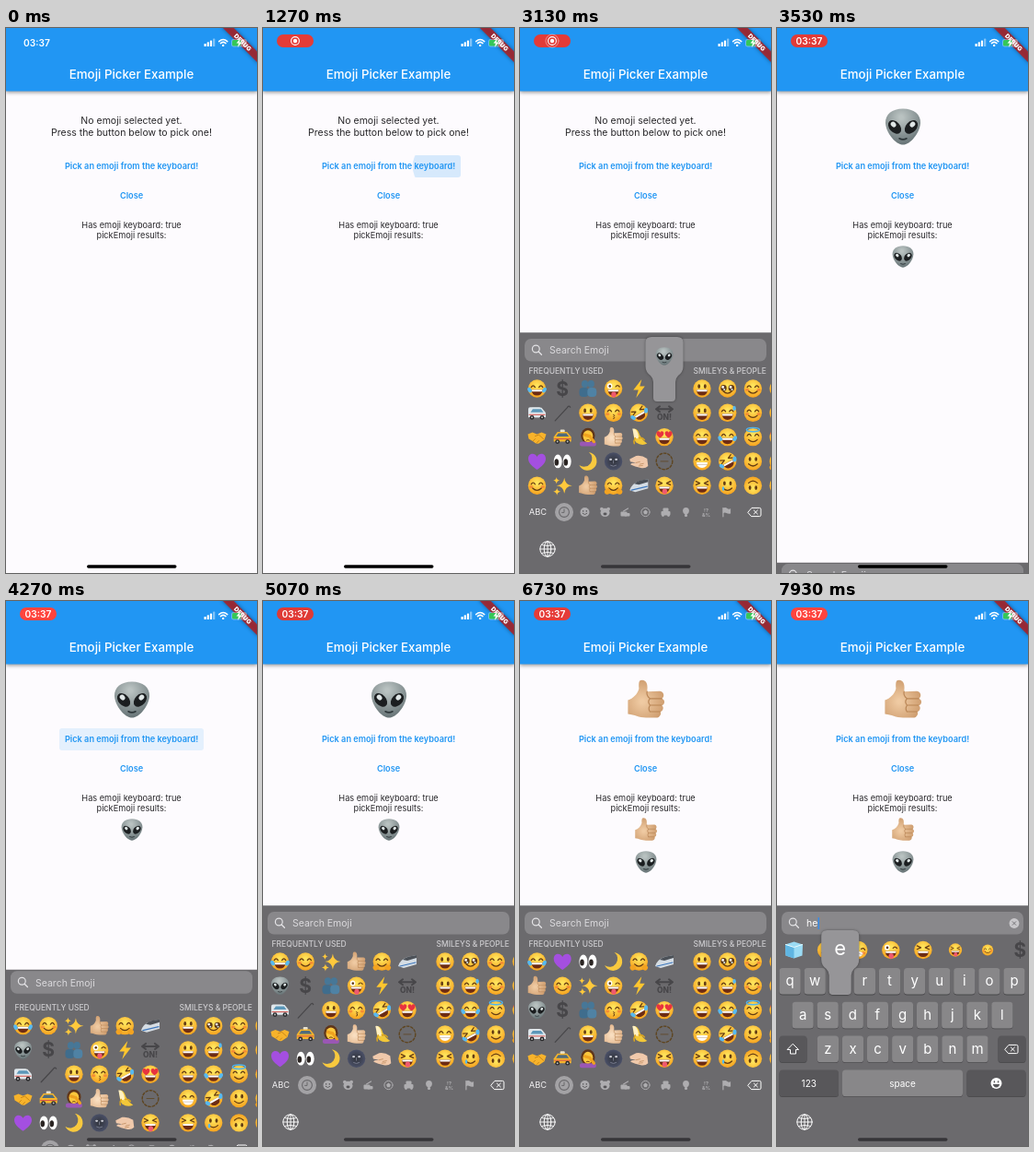
An HTML page with a canvas for the animation above (8 s loop, 273 px wide and 591 px high).

```html
<!DOCTYPE html>
<html lang="en">
<head>
<meta charset="utf-8">
<title>Emoji Picker Example</title>
<style>
  html, body { margin: 0; width: 100%; height: 100%; overflow: hidden; }
  canvas { display: block; width: 273px; height: 591px; }
</style>
</head>
<body>
<canvas></canvas>
<script>
const W = 273, H = 591, LOOP = 8000;
const canvas = document.querySelector('canvas');
const ctx = canvas.getContext('2d');
const dpr = window.devicePixelRatio || 1;
canvas.width = W * dpr;
canvas.height = H * dpr;

const BLUE = '#2196f3', BROWN = '#633b12', FOLD = '#b98555', DARK = '#474649';
const KEYBOARD = '#6b6a6d', KEY = '#888789', DIM = '#58575a', PALE = '#cccbce';

// Drawing helpers
const clamp = v => Math.max(0, Math.min(1, v));
const ramp = (t, start, length) => clamp((t - start) / length);
function fill(d, color) { ctx.fillStyle = color; ctx.fill(new Path2D(d)); }
function line(d, color, width = 1.2) {
  ctx.strokeStyle = color;
  ctx.lineWidth = width;
  ctx.lineCap = ctx.lineJoin = 'round';
  ctx.stroke(new Path2D(d));
}
function oval(x, y, rx, ry, color, angle = 0) {
  ctx.fillStyle = color;
  ctx.beginPath();
  ctx.ellipse(x, y, rx, ry, angle, 0, 7);
  ctx.fill();
}
function ring(x, y, rx, ry, color, width = 1) {
  ctx.strokeStyle = color;
  ctx.lineWidth = width;
  ctx.beginPath();
  ctx.ellipse(x, y, rx, ry, 0, 0, 7);
  ctx.stroke();
}
function box(x, y, w, h, r, color) {
  ctx.fillStyle = color;
  ctx.beginPath();
  ctx.roundRect(x, y, w, h, r);
  ctx.fill();
}
function text(str, x, midY, size, color, weight = 400, align = 'center') {
  ctx.font = `${weight} ${size}px Inter, sans-serif`;
  ctx.textAlign = align;
  ctx.fillStyle = color;
  ctx.fillText(str, x, midY + size * 0.36);
}
function at(x, y, scale, draw, angle = 0) {
  ctx.save();
  ctx.translate(x, y);
  ctx.rotate(angle);
  ctx.scale(scale, scale);
  draw();
  ctx.restore();
}
function faded(alpha, draw) {
  if (alpha <= 0) return;
  ctx.save();
  ctx.globalAlpha *= alpha;
  draw();
  ctx.restore();
}
const pair = draw => [-1, 1].forEach(draw);
function shade(x, y, r, inner, outer) {
  const g = ctx.createRadialGradient(x, y, 1, x, y, r);
  g.addColorStop(0, inner);
  g.addColorStop(1, outer);
  return g;
}

// Emoji, each about 20 units wide around the origin
const heart = (x, y, s, color) => at(x, y, s, () =>
  fill('M0 9C-5 5.5-9.5 2-9.5-3C-9.5-9-2.5-10 0-5C2.5-10 9.5-9 9.5-3C9.5 2 5 5.5 0 9Z', color));
const star = (x, y, s) => at(x, y, s, () => fill('M0-10Q1-1 10 0Q1 1 0 10Q-1 1-10 0Q-1-1 0-10Z', '#ffc93c'));

const eyes = {
  dots: () => pair(s => oval(s * 3.3, -2.4, 1.4, 2.3, BROWN)),
  arcs: () => line('M-6.3-1.4Q-4.2-5-2.1-1.4M2.1-1.4Q4.2-5 6.3-1.4', BROWN),
  squint: () => line('M-6.6-4.6L-2.4-2.6L-6.6-.8M6.6-4.6L2.4-2.6L6.6-.8', BROWN),
  hearts: () => pair(s => heart(s * 4.6, -2.8, 0.42, '#e8333f')),
  wink: () => { oval(-4, -2.8, 2.8, 3, '#fff'); oval(-3.8, -2.6, 1.3, 1.4, BROWN); line('M2.4-2Q4.4-4.6 6.6-2', BROWN); },
  wide: () => pair(s => {
    oval(s * 4.2, -0.6, 3.2, 3.3, '#5c3717');
    oval(s * 4.2 - 0.8, -1.6, 1.4, 1.4, '#fff');
    oval(s * 4.2 + 0.7, 1, 1.1, 0.9, '#cfe3ee');
  })
};
const mouths = {
  grin: () => { fill('M-6 1.2H6Q5.6 7.6 0 7.6Q-5.6 7.6-6 1.2Z', '#6d2c14'); fill('M-5.8 1.2H5.8L5.3 3.2H-5.3Z', '#fff'); },
  teeth: () => { fill('M-6 1.2H6Q5.6 7 0 7Q-5.6 7-6 1.2Z', '#fff'); line('M-5.6 3.6H5.6', '#b79a80', 0.5); },
  smile: () => line('M-4.8 2.8Q0 7.4 4.8 2.8', BROWN),
  kiss: () => line('M0 2Q2.8 2.9.2 4.2Q2.8 5.4 0 6.4', BROWN, 1),
  tongue: () => { mouths.grin(); oval(0.4, 6.4, 2.7, 3, '#ef5a6f'); }
};
const blush = () => pair(s => oval(s * 6.2, 1.4, 2, 1.4, 'rgba(240,90,50,.5)'));
const tears = () => pair(s => oval(s * 8, 1.6, 2, 3, '#55b9f3', s * 0.5));
const sweat = () => oval(7.4, -5, 1.7, 2.6, '#55b9f3');
const drop = () => oval(-4.6, 3.4, 1.2, 2.4, '#55b9f3');
const halo = () => ring(0, -8, 7, 2.2, '#4fb4ee', 1.5);
const hands = () => pair(s => oval(s * 6.4, 6.4, 3.4, 3, '#f3a321', s * 0.5));
function face(eye, mouth, extra, angle = 0) {
  return () => at(0, 0, 1, () => {
    oval(0, 0, 9.7, 9.7, shade(0, -3, 13, '#ffe45c', '#f6a11d'));
    eyes[eye]();
    mouths[mouth]();
    if (extra) extra();
  }, angle);
}
const fist = (inner, outer) => () => {
  fill('M-9.8.2C-7-.6-4.6-3-3.8-6C-4-9-3.9-10.6-2.2-10.6C.4-10.6 1.2-8 .6-4.4L7.6-4.6C10-4.4 10.2-1.2 8.6-.6' +
       'C10.6 0 10.4 2.8 8.6 3.1C9.9 3.8 9.4 6.3 7.8 6.5C8.6 7.6 7.6 9.8 5.6 9.8H0C-4 9.8-6 8.2-9.8 7.8Z',
       shade(-2, 1, 12, inner, outer));
  line('M2.2-.6H8.6M2.2 3H8.4M2.2 6.5H7.6M.6-4.4Q0-2.2 2.2-.6Q.6 1 2.2 3Q1 5 2.2 6.5', FOLD, 0.6);
};
function car(body, glass) {
  fill('M-9.5 5V0L-5.5-5.5H5L9.5 0V5Z', body);
  fill('M-7-.5L-4.6-4H4.4L7-.5Z', glass);
  line('M-8.5 2H8.5', '#d9534a', 1);
  pair(s => { oval(s * 5.5, 5, 2.4, 2.4, '#29292b'); oval(s * 5.5, 5, 1, 1, '#bbb'); });
}
const emoji = {
  joy: face('arcs', 'grin', tears), blush: face('arcs', 'smile', blush), grin: face('dots', 'grin'),
  zany: face('wink', 'tongue'), kiss: face('arcs', 'kiss', blush), hug: face('arcs', 'smile', hands),
  rofl: face('squint', 'grin', tears, -0.5), love: face('hearts', 'grin'), tongue: face('squint', 'tongue'),
  happy: face('arcs', 'grin'), beam: face('arcs', 'teeth'), laugh: face('squint', 'grin'),
  moved: face('wide', 'smile'), nervous: face('arcs', 'grin', sweat), touched: face('dots', 'smile', drop),
  calm: face('arcs', 'smile', blush), angel: face('arcs', 'smile', halo), slight: face('dots', 'smile'),
  flipped: face('dots', 'smile', null, Math.PI), dizzy: face('wink', 'teeth', blush, 0.3),
  thumb: fist('#efcaa2', '#cf9e70'), like: fist('#f9dec0', '#e3b78e'),
  alien() {
    fill('M0-9.8C6-9.8 9.7-6.6 9.5-2C9.2 3.4 4 9.8 0 9.8C-4 9.8-9.2 3.4-9.5-2C-9.7-6.6-6-9.8 0-9.8Z',
         shade(-1, -5, 16, '#b9c2c1', '#5f6c6f'));
    pair(s => {
      oval(s * 4.5, 0.2, 2.9, 4.2, '#1b1e20', s * 0.75);
      oval(s * 5.2, -1.2, 1.3, 1.6, '#dfe6e6', s * 0.75);
    });
    line('M-2 6.4Q0 7.5 2 6.4', '#2d3639', 0.8);
  },
  dollar: () => text('$', 0, 0, 21, DARK, 700),
  people() { pair(s => { oval(s * 3.4, -5, 3.6, 4, '#477797'); box(s * 4.4 - 5, -1, 10, 10, 4, s < 0 ? '#3f6d8d' : '#4f82a4'); }); },
  bolt: () => fill('M3-10L-6 1.5H-.5L-3 10L6.5-2.5H1Z', '#ffc62e'),
  van: () => { box(-9.5, -6, 14, 11, 2, '#dfe7ec'); car('#dfe7ec', '#5b97b9'); },
  taxi: () => { box(-2.5, -8, 5, 3, 1, '#e9e3d0'); car('#f5b52c', '#4f6c7d'); },
  cane: () => line('M-8 8.5L5-5.5Q7-8.5 8.5-6', DARK, 1.2),
  shake() {
    fill('M-10-3L-5-5L0-3L5-5L10-3L8 3L2 7Q-1 8-4 5L-9 2Z', '#f7b32b');
    line('M-2-1L2-2.5L7 2M0 6L2 4M-4 4L-2 2', '#bd7a14', 0.8);
  },
  purple: () => heart(0, 0, 1, '#a44fe0'),
  look: () => pair(s => { oval(s * 5, 0, 4.5, 7.4, '#fff'); oval(s * 5 - 1.4, 1, 2.3, 3.6, '#2a2422'); }),
  sparkle: () => { star(2, 0, 0.85); star(-6.5, -5.5, 0.36); star(-6, 6.5, 0.4); },
  facepalm() {
    oval(0, -1.5, 7.6, 8.4, '#5f3519');
    box(-9, 5, 18, 5, 3, '#9a57b4');
    oval(0, -1, 5.4, 6.4, '#fbc73d');
    line('M-3.5-2.5L2-1L6.5 5', '#efa21f', 3.2);
    line('M-1.5 3.4Q0 2.4 1.5 3.4', BROWN, 0.9);
  },
  moon: () => fill('M1-10A10 10 0 1 1-9.5 4A8.5 8.5 0 0 0 1-10Z', '#f8c93e'),
  dark() {
    oval(0, 0, 9.7, 9.7, shade(0, 0, 10, '#33363f', '#4b5169'));
    pair(s => oval(s * 3, -2, 1.5, 1.1, '#c9cad2'));
    line('M0-1V2M-3 4.4Q0 6.4 3 4.4', '#777b8c', 1);
  },
  banana() {
    fill('M-5-9Q-1-9 1-2Q4 4 9 7Q3 10-3 6Q-7 1-5-9Z', '#f3c838');
    fill('M-7-9Q-3-10-1-4L0 2L-5 1Z', '#fff0c2');
    line('M0 1Q4 0 6 3M-4 1Q-6 4-5 7', '#d9a521', 1.6);
  },
  pinch() {
    fill('M-10-2.5L-3-6Q3-7 9-3L10 5Q7 8 2 7L-4 5.5L-9 3.5Q-9 1.5-6 1.8L-3 1.5L-9.4.4Z', '#f0c9ab');
    line('M-3 1.5L1 .5M1 3.2L5 2.4M0 5L4 4.6', FOLD, 0.7);
  },
  train() {
    fill('M-10 5Q-8-2 0-5L10-7V3L-4 7Z', '#d5dde4');
    fill('M-5-2Q-2-5 2-5.6L10-7V-4L0-1Z', '#4c5158');
    line('M-8 5L9 1', '#3f78bd', 1.2);
  },
  on() {
    line('M-8-4H8M-5-7L-9-4L-5-1M5-7L9-4L5-1', DARK, 2);
    text('ON!', 0, 5, 8.5, DARK, 800);
  },
  ring() {
    ctx.setLineDash([2.5, 2]);
    ring(0, 0, 8.8, 8.8, '#5e4520', 1.4);
    ctx.setLineDash([]);
    line('M-4 0H4', '#5e4520', 0.8);
  },
  ice() { fill('M-9.5-6L0-9L9.5-6L9 6L0 9L-9 6Z', '#9bdcf5'); fill('M-9.5-6L0-3L0 9L-9 6Z', '#5fb5e2'); line('M-9-6L0-3L9-6', '#e8faff', 1); }
};

const words = s => s.split(' ');
const moveUp = (list, name) => [list[0], name, ...list.slice(1).filter(n => n !== name)];
const recent = [words('joy van shake purple blush dollar cane taxi look sparkle people grin facepalm moon thumb ' +
  'zany kiss like dark hug bolt rofl banana pinch train alien on love ring tongue')];
recent.push(moveUp(recent[0], 'alien'));
recent.push(moveUp(recent[1], 'thumb'));
const smileys = words('grin grin happy beam laugh moved nervous joy rofl touched calm blush angel slight flipped zany calm love hug kiss');
const found = words('ice slight dizzy zany laugh tongue calm dollar');

// Timeline in ms
const PRESSES = [1200, 3890, 5930], PICKS = [3230, 5320];
const glide = (t, start) => 1 - (1 - ramp(t, start, 480)) ** 3;
const keyboardLevel = t =>
  glide(t, 1420) - glide(t, 3220) + glide(t, 4100) - glide(t, 5310) + glide(t, 6130);
const within = (t, from, to) => t >= from && t < to;

function statusBar(t) {
  const grow = ramp(t, 70, 330), back = ramp(t, 3250, 200), burst = ramp(t, 3000, 400);
  const pulse = 0.5 + 0.5 * Math.cos((t - 4270) / 1830 * 2 * Math.PI);
  faded(grow, () => box(15, 7, 40, 14, 7, `rgb(${222 + 33 * pulse},${58 + 10 * pulse},${54 + 7 * pulse})`));
  faded(Math.max(1 - grow, back), () => text('03:37', 33.5 + 1.5 * grow, 16 - 2 * grow, 10.2, '#fff', 600));
  faded(grow * (1 - back), () => {
    ring(35, 14, 4.4, 4.4, '#fff', 1.1);
    oval(35, 14, 2.2, 2.2, '#fff');
    if (burst) faded((1 - burst) * 0.6, () => ring(35, 14, 4.4 + 8 * burst, 4.4 + 8 * burst, '#fff'));
  });
  for (let i = 0; i < 4; i++) box(215.5 + 3.2 * i, 17 - 1.8 * i, 2.2, 3 + 1.8 * i, 0.6, i < 3 ? '#fff' : 'rgba(255,255,255,.45)');
  line('M231.6 14.6Q236.2 10.4 240.8 14.6M233.4 16.6Q236.2 14.2 239 16.6', '#fff', 1.5);
  oval(236.2, 18.9, 1.2, 1.2, '#fff');
}

function debugRibbon() {
  at(W, 0, 1, () => {
    ctx.shadowColor = 'rgba(0,0,0,.5)';
    ctx.shadowBlur = 4;
    box(-28, 17.8, 56, 8.4, 0, 'rgba(183,28,28,.8)');
    ctx.shadowBlur = 0;
    text('DEBUG', 0, 22, 6.7, '#fff', 900);
  }, Math.PI / 4);
}

function battery() {
  box(245, 12, 17, 8.4, 2.4, 'rgba(255,255,255,.35)');
  box(246, 13, 9.5, 6.4, 1.5, '#35c759');
  fill('M254.6 11.4L250.6 16.6H253L252 21L256.6 15.4H254Z', '#fff');
}

function page(t) {
  box(0, 0, W, H, 0, '#fdfbfe');
  ctx.save();
  ctx.shadowColor = 'rgba(0,0,0,.4)';
  ctx.shadowBlur = 4;
  ctx.shadowOffsetY = 1.4;
  box(0, 0, W, 68.5, 0, BLUE);
  ctx.restore();
  text('Emoji Picker Example', 136.5, 50, 13.3, '#fff', 500);

  const picked = PICKS.filter(p => t >= p).length;
  if (picked) {
    const name = ['alien', 'thumb'][picked - 1];
    at(137, 107, 2, emoji[name]);
    at(137, 248, 1.2, emoji[name]);
    if (picked > 1) at(137, 283, 1.2, emoji.alien);
  } else {
    text('No emoji selected yet.', 136.5, 100.5, 10.5, '#28272a');
    text('Press the button below to pick one!', 136.5, 113, 10.5, '#28272a');
  }

  for (const press of PRESSES) {
    const age = t - press;
    if (age < 0 || age > 700) continue;
    ctx.save();
    ctx.beginPath();
    ctx.roundRect(58, 138, 157, 24, 3);
    ctx.clip();
    const r = 16 + 11 * (age / 70) ** 1.5;
    oval(190, 150, r, r, `rgba(33,150,243,${0.18 * Math.min(1, (700 - age) / 520)})`);
    ctx.restore();
  }
  text('Pick an emoji from the keyboard!', 136.5, 150, 9.2, BLUE, 600);
  text('Close', 136.5, 182, 9.2, BLUE, 600);
  text('Has emoji keyboard: true', 136.5, 214, 9.2, '#28272a');
  text('pickEmoji results:', 136.5, 225, 9.2, '#28272a');
}

function popup(x, top, draw) {
  at(x, top, 1, () => {
    ctx.shadowColor = 'rgba(0,0,0,.4)';
    ctx.shadowBlur = 3;
    fill('M-14 0H14Q20.5 0 20.5 6V32Q20.5 38 15 42Q12 45 12 49V66Q12 70 8 70H-8Q-12 70-12 66V49' +
         'Q-12 45-15 42Q-20.5 38-20.5 32V6Q-20.5 0-14 0Z', '#969598');
    ctx.shadowBlur = 0;
    draw();
  });
}

const backspace = (x, y) => at(x, y, 1, () =>
  line('M-7 0L-3-4.6H5.5Q7-4.6 7-3.2V3.2Q7 4.6 5.5 4.6H-3ZM-.6-2L3.4 2M3.4-2L-.6 2', '#fff', 1));

function emojiPanel(t) {
  const list = recent[PICKS.filter(p => t >= p + 400).length];
  text('FREQUENTLY USED', 9.5, 371.5, 8.5, PALE, 500, 'left');
  text('SMILEYS & PEOPLE', 188.5, 371.5, 8.5, PALE, 500, 'left');
  const grid = (names, left) => names.forEach((name, i) =>
    at(left + 27.7 * Math.floor(i / 5), 391 + 26.3 * (i % 5), 1, emoji[name]));
  grid(list, 18.5);
  grid(smileys, 198);

  text('ABC', 19.5, 525, 9.3, '#f0eff1');
  oval(48, 525, 10, 10, '#a3a2a5');
  ring(48, 525, 5.4, 5.4, '#69686b', 1.1);
  line('M48 522V525.4H45.6', '#69686b', 1);
  const icon = '#aeadb0';
  const icons = [
    () => { oval(0, 0, 5, 5, icon); pair(s => oval(s * 1.8, -1.2, 0.7, 0.9, DIM)); line('M-2.4 1.4Q0 4 2.4 1.4', DIM, 0.9); },
    () => { pair(s => oval(s * 3.6, -3.4, 1.9, 1.9, icon)); oval(0, 0.4, 5, 4.6, icon); oval(0, 2, 2, 1.4, DIM); },
    () => { box(-5, -0.5, 7, 5, 1, icon); box(-1, 1, 6, 3.5, 1, icon); line('M-2-1L3-4', icon); },
    () => { ring(0, 0, 4.6, 4.6, icon); fill('M0-2.4L2.4-.4L1.4 2.2H-1.4L-2.4-.4Z', icon); },
    () => { box(-5, -1, 10, 4.5, 1, icon); box(-3, -4.5, 6, 4, 1, icon); pair(s => oval(s * 3, 3.6, 1.4, 1.4, icon)); },
    () => { oval(0, -1.4, 3.4, 3.6, icon); box(-1.5, 2, 3, 3, 1, icon); },
    () => { text('!?', 0, -2.4, 5.4, icon, 700); text('&%', 0, 2.8, 5.4, icon, 700); },
    () => { line('M-3.6-4.4V4.8', icon); fill('M-3.6-4.4Q-1-5.6 1-4T4.6-4V1.4Q2 2 0 1T-3.6 1.2Z', icon); }
  ];
  icons.forEach((draw, i) => at(70.5 + 22 * i, 525, 1, draw));
  backspace(255, 525);

  if (within(t, 3110, 3210)) popup(157, 335, () => at(0, 21, 1, emoji.alien));
  if (within(t, 5250, 5310)) popup(102, 335, () => at(0, 21, 1, emoji.thumb));
}

function key(x, y, w, label, size = 15, color = KEY) {
  box(x, y + 0.8, w, 28.6, 3.5, '#49484b');
  box(x, y, w, 28.6, 3.5, color);
  if (label) text(label, x + w / 2, y + (size > 12 ? 13.6 : 14.3), size, '#fff');
}

function letterPanel(t) {
  for (let i = 0; i < 8; i++) {
    const age = t - 7650 - 40 * i;
    const isNew = age >= 55;
    const scale = isNew ? 0.5 + 0.5 * ramp(age, 55, 55) : 1 - 0.5 * ramp(age, 0, 55);
    at(18.5 + 35.1 * i, 378.5, scale, emoji[(isNew ? found : recent[2])[i]]);
  }
  [['qwertyuiop', 2.5, 398], ['asdfghjkl', 16.5, 434.8], ['zxcvbnm', 43.8, 471.6]].forEach(([row, x, y]) =>
    [...row].forEach((c, i) => key(x + 27.1 * i, y, 23.2, c)));
  key(2.5, 471.6, 30, '', 0, DIM);
  at(17.5, 486, 1, () => line('M0-5.5L6 .5H3V5H-3V.5H-6Z', '#fff', 1));
  key(240.5, 471.6, 30, '', 0, DIM);
  backspace(255, 486);
  key(2.5, 508.6, 64.5, '123', 10, DIM);
  key(71, 508.6, 131, 'space', 10);
  key(206.5, 508.6, 64, '', 0, DIM);
  at(238.5, 523, 1, () => {
    oval(0, 0, 6, 6, '#fff');
    pair(s => oval(s * 2.1, -1.6, 0.8, 1.1, DIM));
    fill('M-3.6 1H3.6Q3 4.4 0 4.4T-3.6 1Z', DIM);
  });
  if (within(t, 7260, 7390)) popup(163.6, 393.4, () => text('h', 0, 19, 22, '#fff'));
  if (t >= 7800) popup(68.7, 357, () => text('e', 0, 19, 22, '#fff'));
}

function searchField(t, letters) {
  box(5, 337, 263, 24.5, 7, '#89888b');
  ring(17.3, 348, 3.9, 3.9, '#e4e3e6', 1.2);
  line('M20.2 351L23.4 354.2', '#e4e3e6', 1.3);
  const query = t >= 7860 ? 'he' : t >= 7270 ? 'h' : '';
  text(query || 'Search Emoji', 32, 349.5, 10.5, query ? '#fff' : '#dad9dc', 400, 'left');
  const end = 32 + (query ? ctx.measureText(query).width : 0);
  faded(letters, () => box(end + 0.3, 343, 1.3, 13, 0.6, '#2b8cf6'));
  if (query) {
    oval(258, 349.5, 5.4, 5.4, '#c9c8cb');
    line('M256.2 347.7L259.8 351.3M259.8 347.7L256.2 351.3', '#77767a', 1);
  }
}

function keyboard(t, level) {
  const letters = ramp(t, 6790, 130);
  box(0, 330.2, W, H, 0, KEYBOARD);
  // The search field rides a little higher while the keyboard slides
  at(0, Math.max(-5.5, -20 * (1 - level)), 1, () => searchField(t, letters));
  faded(1 - letters, () => emojiPanel(t));
  faded(letters, () => letterPanel(t));
  at(30, 565, 1, () => {
    ring(0, 0, 8.2, 8.2, '#fff');
    ring(0, 0, 3.8, 8.2, '#fff');
    line('M0-8V8M-8 0H8M-6.6-4.4Q0-2.4 6.6-4.4M-6.6 4.4Q0 2.4 6.6 4.4', '#fff', 0.9);
  });
}

function frame() {
  const t = performance.now() % LOOP;
  ctx.setTransform(dpr, 0, 0, dpr, 0, 0);
  page(t);
  statusBar(t);
  debugRibbon();
  battery();
  const level = keyboardLevel(t);
  if (level > 0) at(0, 261 * (1 - level), 1, () => keyboard(t, level));
  box(88, 582.3, 97.5, 3.4, 1.7, level > 0.1 ? '#363538' : '#000');
  requestAnimationFrame(frame);
}
frame();
</script>
</body>
</html>
```
